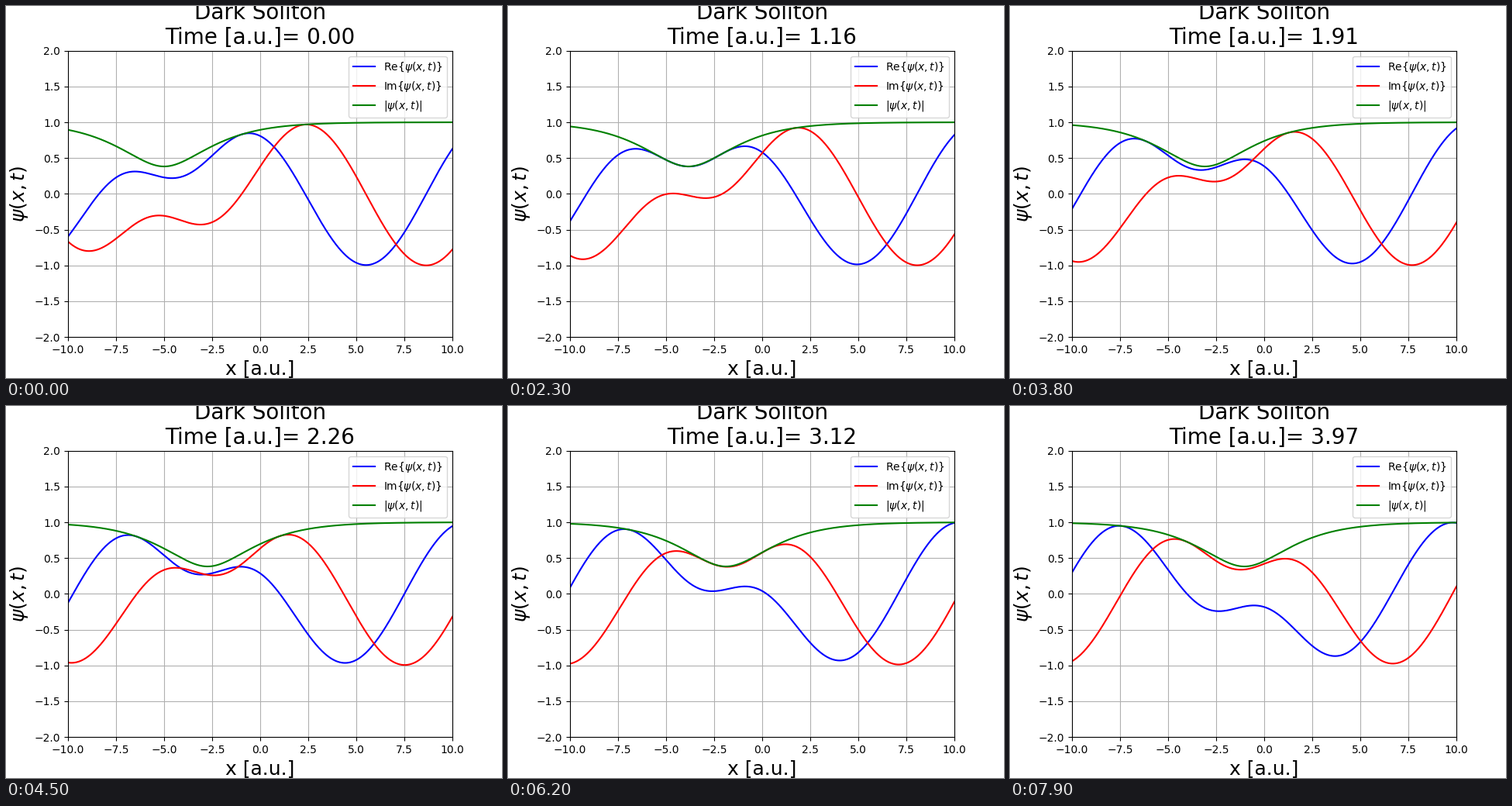
A matplotlib script for the animation above (8000 ms loop, 640 by 480 pixels).

```python
import numpy as np
import matplotlib.pyplot as plt
from matplotlib.animation import FuncAnimation

FRAMES = 80
INTERVAL = 100            # ms
DT = 10 / 199             # time step in atomic units

PHI = np.pi / 8           # sets the depth of the dip
WIDTH = np.sin(PHI) / np.sqrt(2)
X0, SPEED = -5.0, 1.0
K, OMEGA = 0.5, -0.25

x = np.linspace(-10, 10, 1000)


def soliton(t):
    envelope = (np.cos(PHI) * np.tanh(WIDTH * (x - X0 - SPEED * t))
                + 1j * np.sin(PHI))
    return envelope * np.exp(1j * (K * x - OMEGA * t))


fig, ax = plt.subplots(figsize=(6.4, 4.8), dpi=100)
ax.set_xlim(-10, 10)
ax.set_ylim(-2, 2)
ax.grid(True)
ax.set_xlabel("x [a.u.]", fontsize=18)
ax.set_ylabel(r"$\psi(x,t)$", fontsize=18)

re_line, = ax.plot([], [], color="blue", label=r"Re$\{\psi(x,t)\}$")
im_line, = ax.plot([], [], color="red", label=r"Im$\{\psi(x,t)\}$")
abs_line, = ax.plot([], [], color="green", label=r"$|\psi(x,t)|$")
ax.legend(loc="upper right")
title = ax.set_title("", fontsize=20)


def update(frame):
    t = frame * DT
    psi = soliton(t)
    re_line.set_data(x, psi.real)
    im_line.set_data(x, psi.imag)
    abs_line.set_data(x, np.abs(psi))
    title.set_text(f"Dark Soliton\nTime [a.u.]= {t:.2f}")
    return re_line, im_line, abs_line, title


anim = FuncAnimation(fig, update, frames=FRAMES, interval=INTERVAL,
                     repeat=True, repeat_delay=0, blit=False)
plt.show()
```
